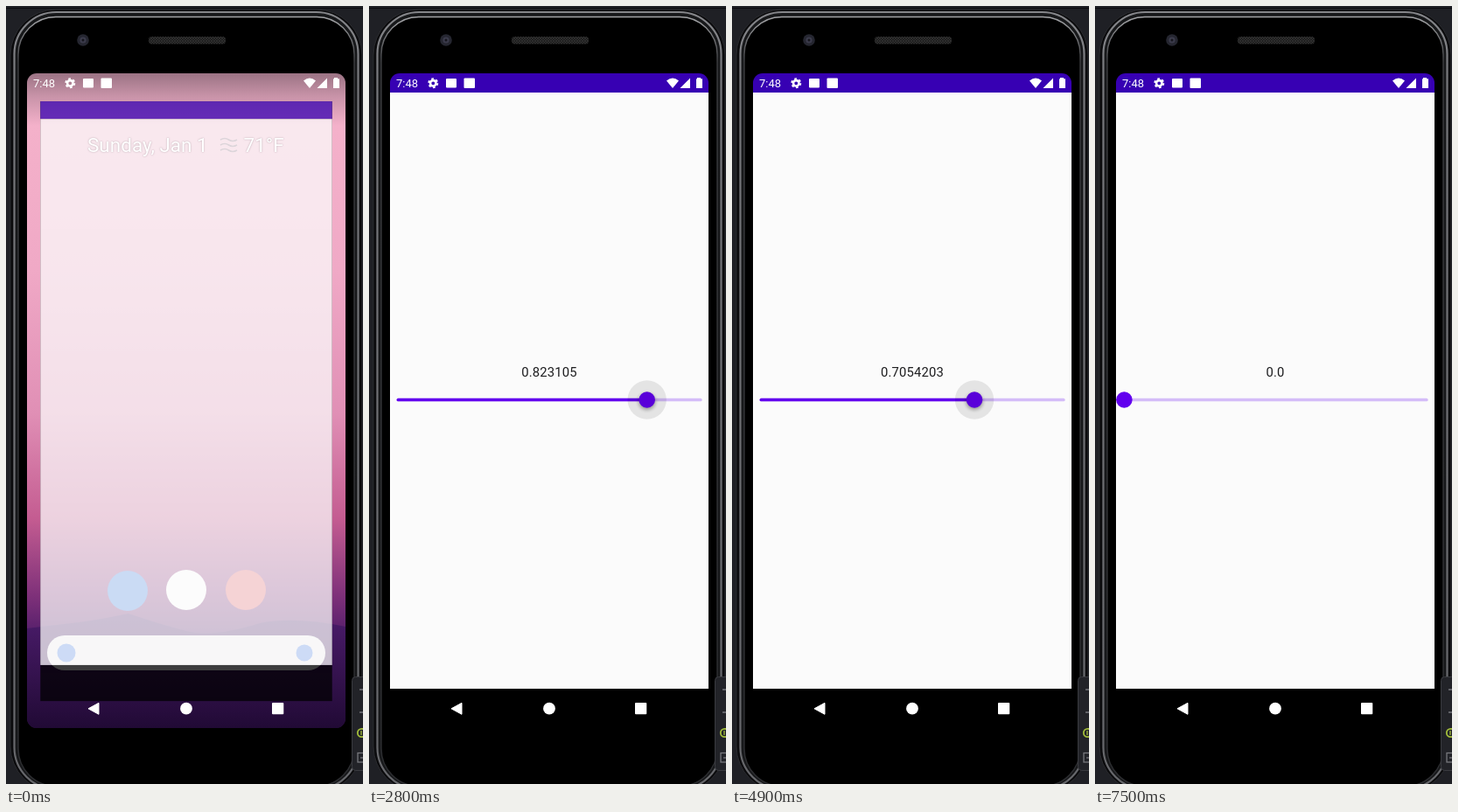
These frames come from a looping animation (408 px wide and 890 px high, 7600 ms). An HTML page:

```html
<!DOCTYPE html>
<html lang="en">
<head>
<meta charset="utf-8">
<title>Slider on a phone</title>
<style>
  html, body { margin: 0; width: 100%; height: 100%; overflow: hidden; background: #1c1d22; }
  svg { display: block; width: 100vw; height: 100vh; }
  text { font-family: Roboto, "Noto Sans", sans-serif; }
  #glance text { text-shadow: 0 0 2px rgba(90, 70, 80, .4); }
</style>
</head>
<body>
<svg viewBox="0 0 408 890" preserveAspectRatio="none">
  <defs>
    <linearGradient id="sky" x1="0" y1="77" x2="0" y2="826" gradientUnits="userSpaceOnUse">
      <stop offset="0" stop-color="#9b7384"/>
      <stop offset=".035" stop-color="#c893a8"/>
      <stop offset=".08" stop-color="#f4b1ca"/>
      <stop offset=".3" stop-color="#f0a9c6"/>
      <stop offset=".52" stop-color="#e08fb5"/>
      <stop offset=".68" stop-color="#c45c91"/>
      <stop offset=".8" stop-color="#7d3079"/>
      <stop offset=".88" stop-color="#451865"/>
      <stop offset="1" stop-color="#2a0d42"/>
    </linearGradient>
    <linearGradient id="hill" x1="0" y1="695" x2="0" y2="826" gradientUnits="userSpaceOnUse">
      <stop offset="0" stop-color="#4b1c6b"/>
      <stop offset="1" stop-color="#210a35"/>
    </linearGradient>
    <linearGradient id="rim" x1="0" y1="6" x2="0" y2="890" gradientUnits="userSpaceOnUse">
      <stop offset="0" stop-color="#85868a"/>
      <stop offset=".1" stop-color="#77787c"/>
      <stop offset="1" stop-color="#66676b"/>
    </linearGradient>
    <linearGradient id="bevel" x1="0" y1="12" x2="0" y2="890" gradientUnits="userSpaceOnUse">
      <stop offset="0" stop-color="#a4a5a8"/>
      <stop offset=".06" stop-color="#3c3d40"/>
      <stop offset="1" stop-color="#2c2d30"/>
    </linearGradient>
    <pattern id="mesh" width="3" height="3" patternUnits="userSpaceOnUse">
      <rect width="3" height="3" fill="#1a1a1a"/>
      <circle cx="1" cy="1" r=".8" fill="#464646"/>
      <circle cx="2.5" cy="2.5" r=".6" fill="#3a3a3a"/>
    </pattern>
    <clipPath id="screen"><rect x="24" y="77" width="364" height="749" rx="11"/></clipPath>
    <filter id="soft" x="-50%" y="-50%" width="200%" height="200%"><feGaussianBlur stdDeviation="2"/></filter>
  </defs>

  <!-- phone body -->
  <rect width="408" height="890" fill="#1f2025"/>
  <path d="M0 2.5H408" stroke="#0c0c0f"/>
  <rect x="5" y="4" width="402" height="895" rx="52" fill="#0b0b0d" stroke="#2b2c30"/>
  <rect x="9.5" y="7" width="393" height="889" rx="48" fill="#17181a" stroke="url(#rim)" stroke-width="2.2"/>
  <rect x="14" y="12.500" width="384" height="880" rx="43" fill="#000" stroke="url(#bevel)" stroke-width="1.400"/>
  <circle cx="88" cy="39" r="6.8" fill="#252630"/>
  <circle cx="88" cy="39" r="3.6" fill="#3b3b4b"/>
  <circle cx="88" cy="39" r="1.5" fill="#16161d"/>
  <rect x="163" y="35" width="88" height="8.5" rx="3.5" fill="url(#mesh)"/>

  <g clip-path="url(#screen)">
    <g id="home">
      <rect x="24" y="77" width="364" height="749" fill="url(#sky)"/>
      <path d="M24 712Q48 709 75 706T140 695Q175 707 206 715T290 706Q330 698 388 710V826H24Z" fill="url(#hill)"/>
      <circle cx="139" cy="669" r="23" fill="#3f7fe0"/>
      <circle cx="206" cy="668" r="23" fill="#fff"/>
      <circle cx="274" cy="668" r="23" fill="#e4606a"/>
      <rect x="47" y="720" width="318" height="40" rx="20" fill="#f0eff3"/>
      <circle cx="69" cy="740" r="10.5" fill="#4a7fe8"/>
      <circle cx="341" cy="740" r="9.5" fill="#4a7fe8"/>
    </g>

    <g id="app">
      <rect x="24" y="77" width="364" height="749" fill="#000"/>
      <rect x="24" y="77" width="364" height="22" fill="#3700b3"/>
      <rect x="24" y="99" width="364" height="682" fill="#fbfbfb"/>
      <g id="slider">
        <text id="value" x="206" y="424" text-anchor="middle" font-size="14.83" letter-spacing=".15" fill="#1d1d1f"></text>
        <g stroke="#6200ee" stroke-width="3.7" stroke-linecap="round">
          <path d="M33.4 450.5H378.8" stroke-opacity=".25"/>
          <path id="active"/>
        </g>
        <g id="thumb">
          <circle id="shade" cy="2" r="9.6" fill="#000" opacity=".35" filter="url(#soft)"/>
          <circle r="9.27" fill="#6200ee"/>
          <circle id="halo" r="22.2" fill="#000" opacity=".09"/>
        </g>
      </g>
    </g>

    <g id="glance" fill="#fff" font-size="22.5">
      <text x="93" y="167">Sunday, Jan 1</text>
      <text x="271.5" y="167">71°F</text>
      <path d="M245 153q5-3 9.5 0t9.5 0M245 159q5-3 9.5 0t9.5 0M245 165q5-3 9.5 0t9.5 0"
        fill="none" stroke="#dcd5da" stroke-width="1.6"/>
    </g>
  </g>

  <!-- system bars -->
  <g fill="#fff">
    <text x="31" y="93" font-size="13">7:48</text>
    <g transform="translate(73.3 88.3)" fill="none" stroke="#fff">
      <circle r="3.2" stroke-width="2.6"/>
      <circle r="5" stroke-width="2" stroke-dasharray="2.618"/>
    </g>
    <rect x="88" y="83" width="12" height="10.5" rx="1"/>
    <rect x="108.5" y="82.5" width="12.5" height="11.5" rx="1"/>
    <path d="M340 85.5Q347 79.5 354 85.5L347 94Z"/>
    <path d="M367 82.5V94H355.5Z"/>
    <path d="M375 82h4v1.3h1.5q.5 0 .5.5V93.5q0 .5-.5.5h-6q-.5 0-.5-.5V83.8q0-.5.5-.5H375Z"/>
    <path d="M94 803.8L106 797.3V810.3Z" stroke="#fff" stroke-linejoin="round"/>
    <circle cx="206" cy="803.7" r="6.9"/>
    <rect x="304" y="797" width="13.3" height="13.3" rx="1"/>
  </g>

  <!-- side panel -->
  <rect x="395.5" y="767.5" width="30" height="107" rx="4" fill="#222328" stroke="#3a3b40"/>
  <g fill="none" stroke="#77787d" stroke-width="1.3">
    <path d="M404 782H408M404 808H408"/>
    <rect x="402" y="854.5" width="12" height="10.5"/>
    <path d="M405 860H408"/>
    <circle cx="406.5" cy="831.5" r="4.7" stroke="#a2bd3a" stroke-width="1.8"/>
    <path d="M406 829V834" stroke="#a2bd3a"/>
  </g>
</svg>

<script>
  const LOOP = 7600, TICK = 100;
  const LEFT = 33.4, SPAN = 345.4;
  const $ = id => document.getElementById(id);

  // [time, slider value]
  const drag = [
    [2100, 0], [2800, .823105], [3000, .823105], [3800, .0581362],
    [4100, .7931065], [4600, .9523174], [4700, .9523174], [5300, 0],
    [5400, 0], [5600, .9061428], [5700, .8596803], [5800, .8596803],
    [6000, .9523174], [6600, .1316259], [6700, .08146679],
    [7100, .9174632], [7400, 0]
  ];

  const smooth = p => p * p * (3 - 2 * p);

  function valueAt(t) {
    const i = drag.findIndex(k => k[0] >= t);
    if (i < 1) return 0;
    const [t0, a] = drag[i - 1], [t1, b] = drag[i];
    return a + (b - a) * smooth((t - t0) / (t1 - t0));
  }

  const label = v => v ? String(+v.toPrecision(7)) : "0.0";
  const show = (id, on) => { $(id).style.display = on ? "" : "none"; };

  function drawWindow(t) {
    const left = Math.max(0, 1 - t / 300);
    const grow = left ** 1.8;
    $("app").setAttribute("transform",
      `translate(206 ${451.5 + .6 * grow}) scale(${1 - .084 * grow}) translate(-206 -451.5)`);
    $("app").setAttribute("opacity", t < 100 ? .74 : 1);
    show("home", t < 300);
    show("glance", t < 100);
  }

  function drawSlider(t) {
    const v = valueAt(t), x = LEFT + SPAN * v;
    const pressed = t >= 2200 && t < 7400;
    show("slider", t >= 1000);
    $("value").textContent = label(v);
    $("active").setAttribute("d", `M${LEFT} 450.5H${x}`);
    $("thumb").setAttribute("transform", `translate(${x} 450.5)`);
    show("active", v > 0);
    show("halo", pressed);
    show("shade", pressed);
  }

  function draw(now) {
    const t = Math.floor((now % LOOP) / TICK) * TICK;
    drawWindow(t);
    drawSlider(t);
    requestAnimationFrame(draw);
  }

  draw(0);
</script>
</body>
</html>
```
